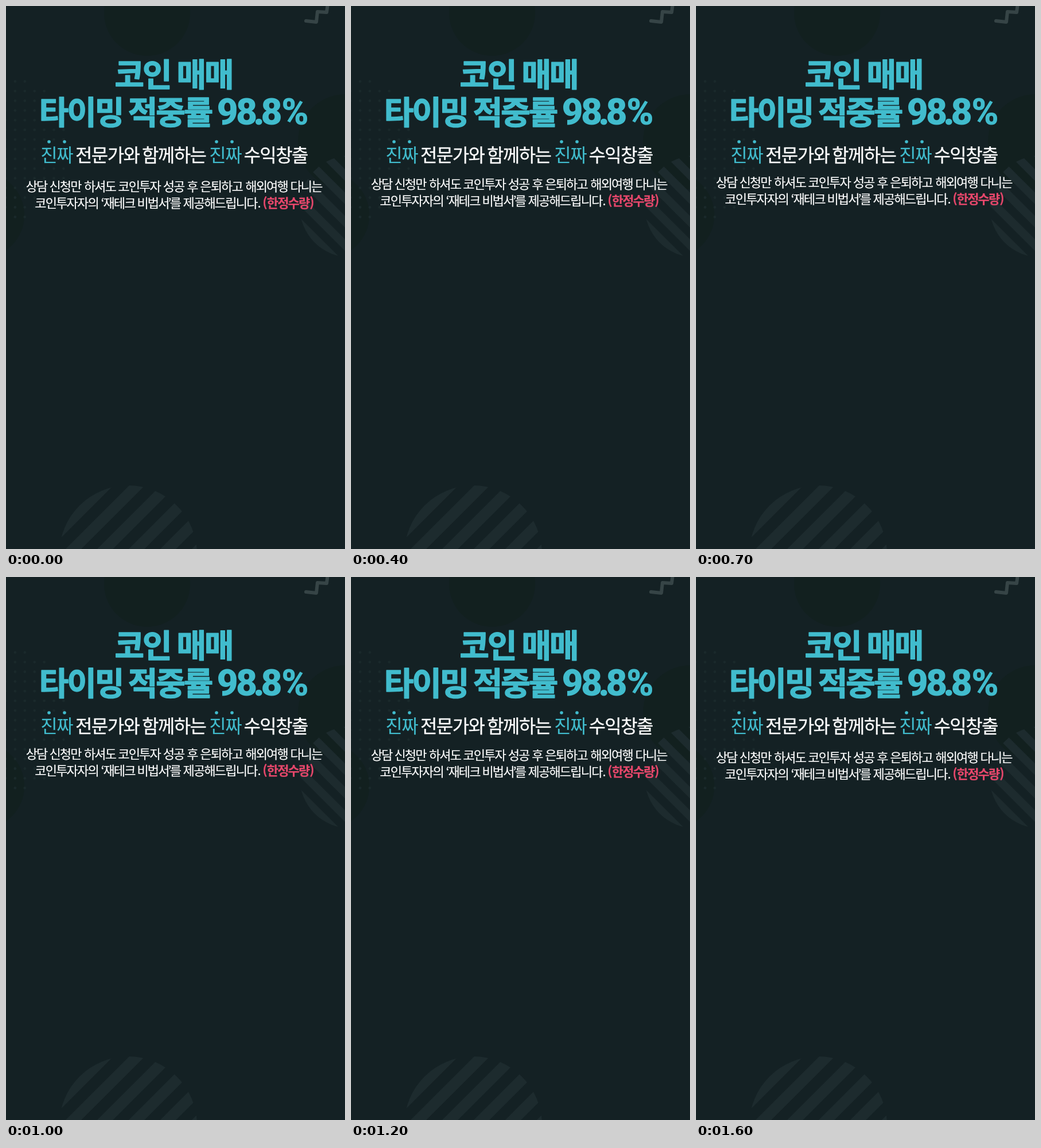
Recreate the animation shown at these times as an HTML page. Size 591 by 948 pixels, loop 1.7 s.

```html
<!DOCTYPE html>
<html lang="ko">
<head>
<meta charset="utf-8">
<style>
  html, body { margin: 0; width: 100%; height: 100%; overflow: hidden; background: #142124; }
  svg { display: block; width: 591px; height: 948px; }
  text {
    font-family: "Noto Sans CJK KR", "Noto Sans CJK JP", sans-serif;
    text-anchor: middle;
    stroke-linejoin: round;
  }
  .num { font-family: Roboto, sans-serif; font-size: 64px; font-weight: 900; }
</style>
</head>
<body>
<svg viewBox="0 0 591 948" lang="ko">
  <defs>
    <clipPath id="disc"><circle r="120"/></clipPath>
  </defs>
  <rect width="591" height="948" fill="#142124"/>
  <g fill="#12201f">
    <circle cx="246" cy="12" r="75"/>
    <circle cx="592" cy="237" r="83"/>
    <circle cx="-43" cy="365" r="75"/>
  </g>
  <g id="dots" fill="#1a292b"></g>
  <g id="stripes" fill="#1d2b2e"></g>
  <path d="M523 26 L541 28 L543 10 L559 11 L561 -4" fill="none" stroke="#364446"
        stroke-width="6" stroke-linecap="round" stroke-linejoin="round"/>
  <g id="head"></g>
  <g id="note"></g>
</svg>
<script>
const NS = 'http://www.w3.org/2000/svg';
const CYAN = '#41bccd', WHITE = '#ffffff', PINK = '#e5476b';
const $ = id => document.getElementById(id);

function add(parent, tag, attrs, content) {
  const el = document.createElementNS(NS, tag);
  for (const k in attrs) el.setAttribute(k, attrs[k]);
  if (content) el.textContent = content;
  parent.appendChild(el);
  return el;
}

// Each word is [centre x, text]; negative tracking is balanced around the centre.
function words(parent, y, style, list) {
  for (const [cx, str] of list) {
    add(parent, 'text', {
      x: cx + style.track / 2, y,
      'font-size': style.size, 'font-weight': style.weight,
      'letter-spacing': style.track,
      fill: style.color, stroke: style.color, 'stroke-width': style.line
    }, str);
  }
}

function dotField(cx, cy, rx, ry, step) {
  for (let y = cy - 7 * step; y <= cy + 7 * step; y += step)
    for (let x = -1; x < cx + rx; x += step)
      if (((x - cx) / rx) ** 2 + ((y - cy) / ry) ** 2 < 1)
        add($('dots'), 'circle', { cx: x, cy: y, r: 2.4 });
}

function stripedDisc(x, y, scale, angle) {
  const clip = add($('stripes'), 'g', {
    transform: `translate(${x} ${y}) rotate(${angle}) scale(${scale})`,
    'clip-path': 'url(#disc)'
  });
  for (let i = 0; i < 7; i++)
    add(clip, 'rect', { x: -122.4 + i * 38.9, y: -120, width: 19.3, height: 240 });
}

dotField(24, 250, 85, 120, 16.9);
stripedDisc(601, 350, 0.742, -45);
stripedDisc(213, 957, 1, 45);

const title = { size: 56, weight: 900, track: -3, color: CYAN, line: 1.4 };
const sub = { size: 32, weight: 500, track: -1.6, color: WHITE, line: 0.3 };
const accent = { ...sub, weight: 400, color: CYAN, line: 0.1 };
const body = { size: 22, weight: 400, track: -1.8, color: WHITE, line: 0.2 };
const strong = { ...body, weight: 900, color: PINK, line: 0.2 };

const head = $('head'), note = $('note');

words(head, 140, title, [[239.5, '코인'], [347.5, '매매']]);
words(head, 206, title, [[132, '타이밍'], [287, '적중률']]);
add(head, 'text', { class: 'num', x: '386 419.5 441 463 504', y: 207, fill: CYAN }, '98.8%');

for (const x of [75, 102, 367, 394])
  add(head, 'circle', { cx: x, cy: 237, r: 2.8, fill: CYAN });
words(head, 271.5, accent, [[89, '진짜'], [383, '진짜']]);
words(head, 271.5, sub, [[177.5, '전문가와'], [293.5, '함께하는'], [471, '수익창출']]);

words(note, 322.8, body, [
  [54, '상담'], [104, '신청만'], [164.5, '하셔도'], [233, '코인투자'], [293, '성공'],
  [325.5, '후'], [376, '은퇴하고'], [455, '해외여행'], [524, '다니는']
]);
words(note, 352.4, body, [
  [106.5, '코인투자자의'], [168.5, '‘'], [198, '재테크'], [257, '비법서'], [285.5, '’'],
  [296, '를'], [374, '제공해드립니다'], [441.5, '.']
]);
words(note, 352.4, strong, [[451.5, '('], [492.5, '한정수량'], [533.5, ')']]);

// The note climbs 7px, rests, then sinks back, one pixel per 100 ms.
function draw(ms) {
  const k = Math.floor((ms % 1700) / 100);
  const lift = Math.min(k, 7, 16 - k);
  note.setAttribute('transform', `translate(0 ${-lift})`);
}

function tick() {
  draw(performance.now());
  requestAnimationFrame(tick);
}
tick();
</script>
</body>
</html>
```
